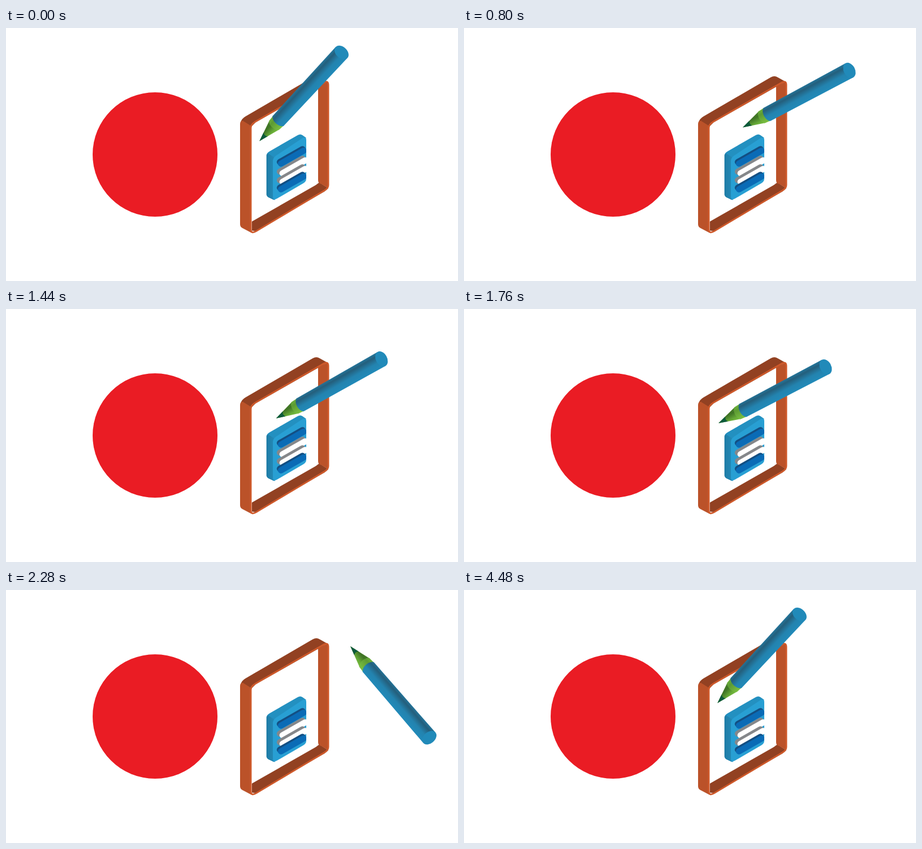
Recreate the animation shown at these times as an HTML page. Size 840 by 472 pixels, loop 5 s.

```html
<!DOCTYPE html>
<html lang="en">
<head>
<meta charset="utf-8">
<title>Pen and clipboard</title>
<style>
  html, body { margin: 0; width: 100%; height: 100%; overflow: hidden; background: #fff; }
  svg { display: block; width: 840px; height: 472px; }
  .bar { fill: none; stroke-width: 11.5; stroke-linecap: round; }
</style>
</head>
<body>
<svg viewBox="0 0 840 472" xmlns="http://www.w3.org/2000/svg">
  <defs>
    <linearGradient id="barrel" x1="0" y1="0" x2="0" y2="1">
      <stop offset="0" stop-color="#23769c"/>
      <stop offset=".22" stop-color="#245f7c"/>
      <stop offset=".6" stop-color="#2383af"/>
      <stop offset="1" stop-color="#218ab9"/>
    </linearGradient>
    <linearGradient id="cone" x1="0" y1="0" x2="0" y2="1">
      <stop offset="0" stop-color="#477f28"/>
      <stop offset=".3" stop-color="#3f7325"/>
      <stop offset=".75" stop-color="#69ad38"/>
      <stop offset="1" stop-color="#78bd40"/>
    </linearGradient>
    <linearGradient id="ring" x1="0" y1="0" x2="0" y2="1">
      <stop offset="0" stop-color="#6cb23a"/>
      <stop offset=".3" stop-color="#5c9a33"/>
      <stop offset="1" stop-color="#7cc242"/>
    </linearGradient>
    <linearGradient id="edge">
      <stop offset="0" stop-color="#1f7ca6"/>
      <stop offset="1" stop-color="#2389b6"/>
    </linearGradient>
    <clipPath id="sheet"><path d="M484 198H558V322H484Z"/></clipPath>
  </defs>

  <circle cx="277" cy="236" r="116" fill="#ea1c24"/>

  <!-- clipboard -->
  <path fill="#924122" d="M436 176Q438 169 445 165L570 92Q577 88 583 92L599 101L592 103L464 176L456 184Z"/>
  <path fill="#bb5229" d="M435 179Q435 173 440 173L456 183V382L439 373Q435 371 435 366Z"/>
  <path fill="#924122" d="M457 361L574 294Q580 290 582 288L599 299L592 305L464 379L457 378Z"/>
  <path fill="#bb5229" d="M580 108L599 100V299L586 291Q580 290 580 284Z"/>
  <path fill="none" stroke="#cf592a" stroke-width="3" d="M455 186Q455 180 463 175L590 102Q599 97 599 106V293Q599 299 592 303L465 379Q455 385 455 375Z"/>

  <!-- document -->
  <path fill="#2390c0" d="M484 239Q484 233 490 230L542 200Q547 197 551 200L558 205L500 242V321L488 316Q484 314 484 309Z"/>
  <path fill="url(#edge)" d="M484 239Q484 235 487 234L498 241V321L488 316Q484 314 484 309Z"/>
  <path fill="#289fd3" d="M496 249Q496 242 502 238L550 206Q558 202 558 209V281Q558 287 552 290L504 318Q496 323 496 314Z"/>
  <g id="bars" clip-path="url(#sheet)"></g>

  <g id="pen">
    <path fill="url(#cone)" d="M0 0L41 -12.5Q46 0 41 12.5Z"/>
    <path fill="#0c5a3b" d="M0 0L17 -5.2Q13 0 17 5.2Z"/>
    <path fill="url(#ring)" d="M40 -12.5C33 -8 33 8 40 12.5L53 13.5V-13.5Z"/>
    <path fill="url(#barrel)" d="M51 -13.8C43 -9 43 9 51 13.8L225 15V-15Z"/>
    <ellipse cx="225" rx="10.5" ry="15" fill="#218ab9"/>
  </g>
</svg>
<script>
  const STEP = 40, LOOP = 5000;

  const bars = [
    ['#134f83', '#0a6bb6', 252],
    ['#85878a', '#ffffff', 270],
    ['#85878a', '#ffffff', 286],
    ['#134f83', '#0a6bb6', 300]
  ];
  const line = (color, x, y) =>
    `<path class="bar" stroke="${color}" d="M${x} ${y}l42 -24"/>`;
  document.getElementById('bars').innerHTML = bars.map(([shade, face, y]) =>
    line(shade, 509, y - 2) + line(face, face === '#ffffff' ? 514 : 511, y + 1)).join('');

  // step, tip x, tip y, angle, pivot distance for the move that follows
  const keys = [
    [0, 471, 211, -47.3, 0],
    [8, 476, 186, -3, 0],
    [16, 508, 204, -47.5, 0],
    [24, 528, 167, -9, 0],
    [32, 521, 206, -51, 0],
    [40, 483, 202, -8, 0],
    [48, 463, 224, -47.6, 45],
    [57, 640, 105, 49.3, 0],
    [103, 640, 105, 49.3, 45],
    [112, 471, 211, -47.3, 0],
    [125, 471, 211, -47.3, 0]
  ];
  const pen = document.getElementById('pen');
  const ease = u => u < .5 ? 2 * u * u : 1 - 2 * (1 - u) ** 2;
  const mix = (a, b, u) => a + (b - a) * u;
  const offset = (deg, r) => [r * Math.cos(deg * Math.PI / 180), r * Math.sin(deg * Math.PI / 180)];

  function pose(step) {
    const i = keys.findIndex(k => k[0] > step) - 1;
    const [s0, x0, y0, a0, r] = keys[i];
    const [s1, x1, y1, a1] = keys[i + 1];
    const u = ease((step - s0) / (s1 - s0));
    const a = mix(a0, a1, u);
    const [p, q, o] = [a0, a1, a].map(d => offset(d, r));
    return [
      mix(x0 + p[0], x1 + q[0], u) - o[0],
      mix(y0 + p[1], y1 + q[1], u) - o[1],
      a
    ];
  }

  function draw() {
    const step = Math.floor(performance.now() % LOOP / STEP);
    const [x, y, a] = pose(step);
    pen.setAttribute('transform', `translate(${x} ${y}) rotate(${a})`);
    requestAnimationFrame(draw);
  }
  draw();
</script>
</body>
</html>
```
